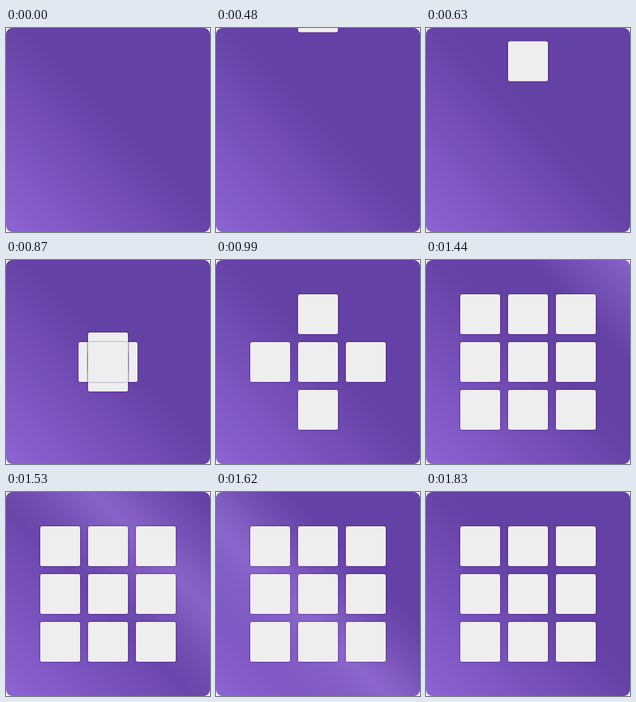
An HTML page that plays this animation: 256x256 px, repeating every 5190 ms.

```html
<!DOCTYPE html>
<html lang="en">
<head>
<meta charset="utf-8">
<title>Tile grid</title>
<style>
  html, body { margin: 0; width: 100%; height: 100%; overflow: hidden; background: #fff; }
  svg { display: block; width: 100vw; height: 100vh; }
</style>
</head>
<body>
<svg viewBox="0 0 256 256">
  <defs>
    <linearGradient id="base" gradientUnits="userSpaceOnUse" x1="0" y1="256" x2="256" y2="0">
      <stop offset="0" stop-color="#8d64d4"/>
      <stop offset=".55" stop-color="#6441a4"/>
    </linearGradient>
    <linearGradient id="shine" gradientUnits="userSpaceOnUse" x1="-64" y1="64" x2="64" y2="-64">
      <stop offset="0" stop-color="#946fd4" stop-opacity="0"/>
      <stop offset=".5" stop-color="#946fd4" stop-opacity=".75"/>
      <stop offset="1" stop-color="#946fd4" stop-opacity="0"/>
    </linearGradient>
    <filter id="shadow" x="-10%" y="-10%" width="120%" height="120%">
      <feDropShadow dx="0" dy="0" stdDeviation="1" flood-color="#2c1458" flood-opacity=".6"/>
    </filter>
  </defs>
  <rect width="256" height="256" rx="8" fill="url(#base)"/>
  <rect id="glow" width="256" height="256" rx="8" fill="url(#shine)"/>
  <g id="tiles" fill="#eee"></g>
</svg>
<script>
const LOOP = 5190, STEP = 30, GAP = 60;
const SIZE = 50, CENTER = 128 - SIZE / 2;
const glow = document.getElementById('glow');
const shine = document.getElementById('shine');
const layer = document.getElementById('tiles');

const progress = (t, from, to) => Math.min(1, Math.max(0, (t - from) / (to - from)));
const show = (el, visible) => el.setAttribute('visibility', visible ? 'visible' : 'hidden');

function addTile(col, row) {
  const el = document.createElementNS('http://www.w3.org/2000/svg', 'rect');
  const attrs = { width: SIZE, height: SIZE, rx: 2.5, filter: 'url(#shadow)' };
  for (const name in attrs) el.setAttribute(name, attrs[name]);
  layer.append(el);
  return { el, col, row };
}

// Corners lie below the arms, and the center tile lies on top.
const tiles = [
  [-1, -1], [1, -1], [-1, 1], [1, 1],
  [-1, 0], [1, 0], [0, -1], [0, 1],
  [0, 0]
].map(([col, row]) => addTile(col, row));

function render(t) {
  const drop = progress(t, 450, 840);
  const split = progress(t, 840, 990);
  const spread = progress(t, 990, 1140);

  for (const { el, col, row } of tiles) {
    const corner = col && row;
    const center = !col && !row;
    const dx = col * GAP * (corner ? spread : split);
    const dy = row * GAP * split - 160 * (1 - drop);
    el.setAttribute('x', CENTER + dx);
    el.setAttribute('y', CENTER + dy);
    show(el, corner ? spread > 0 : center ? t >= 480 : split > 0);
  }

  // The shine crosses from the top right to the bottom left.
  const shift = 178 - 372 * progress(t, 1380, 1830);
  shine.setAttribute('gradientTransform', `translate(${128 + shift} ${128 - shift})`);
  show(glow, t >= 1410 && t < 1830);
}

const start = performance.now();
function tick() {
  const t = (performance.now() - start) % LOOP;
  render(Math.floor(t / STEP) * STEP);
  requestAnimationFrame(tick);
}
tick();
</script>
</body>
</html>
```
